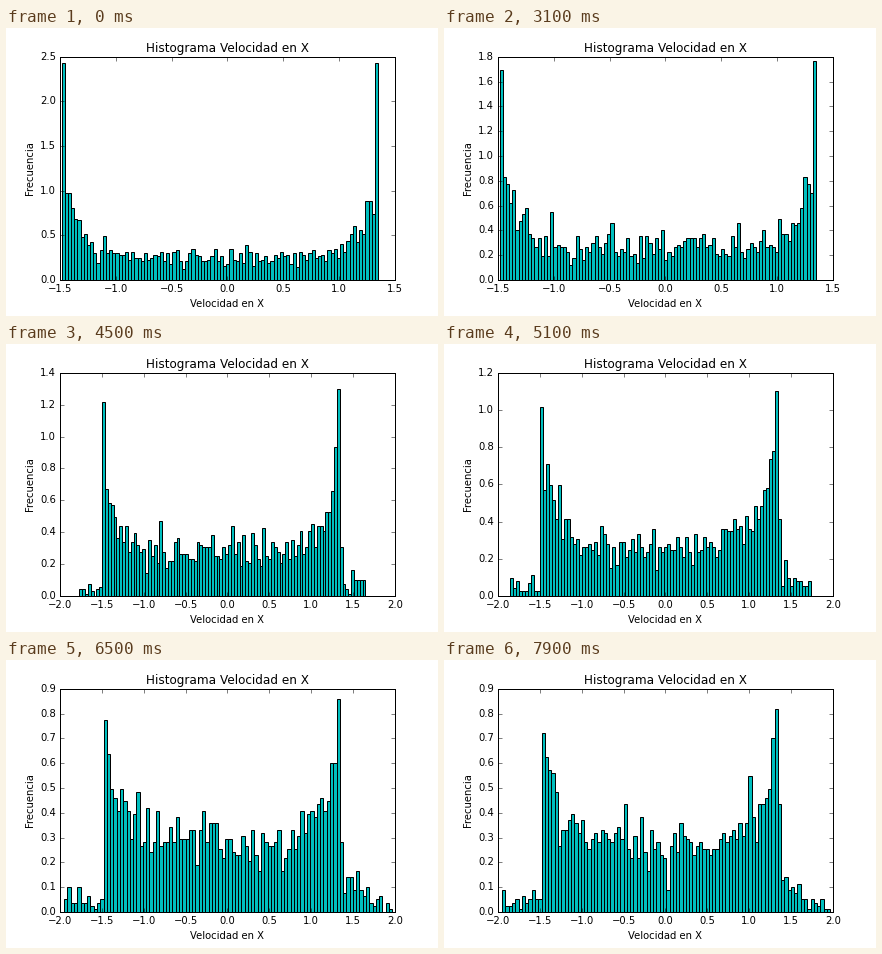
Write a matplotlib script that moves like this. It is 432x288 px and loops after 8000 ms.

```python
import numpy as np
import matplotlib.pyplot as plt
from matplotlib.animation import FuncAnimation

plt.style.use("classic")
plt.rcParams.update({
    "font.family": "DejaVu Sans",
    "font.size": 10,
    "figure.facecolor": "white",
    "savefig.dpi": "figure",
    "figure.subplot.bottom": 0.125,
})

BINS = 100
PARTICLES = 2000
LAST_STEP = 38
CENTER, RADIUS = -0.065, 1.42
LEFT_PEAK, RIGHT_PEAK = -1.475, 1.335


def velocity_range(step):
    """The fastest particles start to escape the initial range at step 14."""
    times = [14, 18, 24, 31]
    low = np.interp(step, times, [-1.485, -1.683, -1.857, -1.95])
    high = np.interp(step, times, [1.35, 1.554, 1.745, 1.97])
    return low, high


def peak_heights(step):
    right = np.interp(step, [0, 8, 14, 24, 31, 38],
                      [2.43, 1.90, 1.77, 1.10, 0.86, 0.82])
    return right * (1 - 0.12 * step / LAST_STEP), right


def densities(step):
    """Bin edges and normalised heights of the histogram at one step."""
    rng = np.random.default_rng(100 + step)
    low, high = velocity_range(step)
    left, right = peak_heights(step)
    edges = np.linspace(low, high, BINS + 1)
    width = edges[1] - edges[0]
    mid = edges[:-1] + width / 2
    index = np.arange(BINS)
    first = int((LEFT_PEAK - low) / width)
    last = int((RIGHT_PEAK - low) / width)

    # A shallow bowl that rises towards both peaks.
    u = (mid - CENTER) / RADIUS
    mean = (0.25 + 0.03 * step / LAST_STEP) * (1 + 0.4 * u ** 4)
    mean += 0.3 * left * np.exp(-(abs(index - first) - 1) / 4)
    mean += 0.3 * right * np.exp(-(abs(index - last) - 1) / 4)

    # Thin tails outside, with a shoulder beside the right peak.
    spread = np.clip((step - 14) / 10, 0, 1)
    fade = 0.12 * spread * np.clip((2.05 - mid) / 0.65, 0, 1)
    mean = np.where(index < first, 0.045 * spread, mean)
    mean = np.where(index > last, fade, mean)
    mean[last + 1:last + 2] = 0.45 * right * spread

    unit = 1 / (PARTICLES * width)
    counts = rng.poisson(mean / unit)
    counts[[0, -1]] = np.maximum(counts[[0, -1]], 1)
    heights = counts * unit
    heights[first], heights[last] = left, right
    return edges, heights


def labels(values):
    return [f"{v:.1f}".replace("-", "\u2212") for v in values]


def scale_axes(low, peak):
    limit = 1.5 if low > -1.5 else 2.0
    xticks = np.linspace(-limit, limit, int(4 * limit) + 1)
    ystep = 0.5 if peak > 1.8 else 0.2 if peak > 0.9 else 0.1
    yticks = np.arange(int(np.ceil(peak / ystep)) + 1) * ystep
    ax.set_xticks(xticks, labels(xticks))
    ax.set_yticks(yticks, labels(yticks))
    ax.set_xlim(-limit, limit)
    ax.set_ylim(0, yticks[-1])


fig, ax = plt.subplots(figsize=(6, 4), dpi=72)
ax.set_title("Histograma Velocidad en X")
ax.set_xlabel("Velocidad en X")
ax.set_ylabel("Frecuencia")
bars = ax.bar(np.zeros(BINS), np.ones(BINS), color=(0, 0.75, 0.75),
              edgecolor="black", linewidth=1)


def update(frame):
    step = 0 if frame < 5 else 1 + (frame - 5) // 2
    edges, heights = densities(step)
    for bar, x, h in zip(bars, edges, heights):
        bar.set_bounds(x, 0, edges[1] - edges[0], h)
    scale_axes(edges[0], heights.max())
    return bars


anim = FuncAnimation(fig, update, frames=80, interval=100,
                     init_func=lambda: update(0), repeat=True,
                     repeat_delay=0, blit=False)
plt.show()
```
